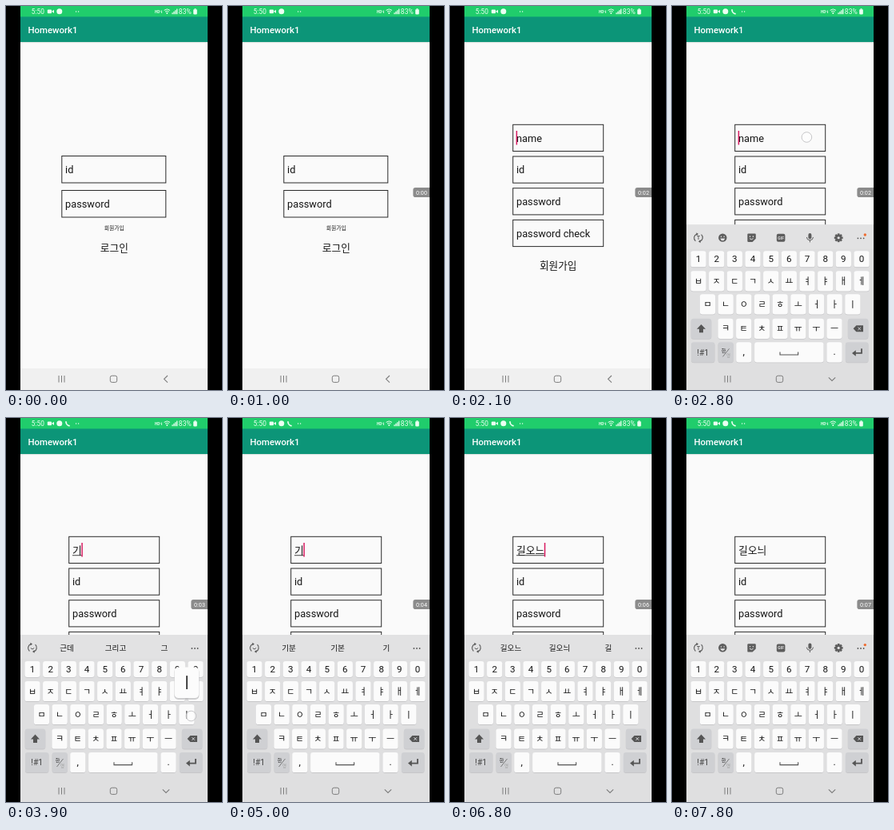
These frames come from a looping animation (270 px wide and 480 px high, 8 s). An HTML page:

```html
<!DOCTYPE html>
<html lang="ko">
<head>
<meta charset="utf-8">
<title>Sign-up screen</title>
<style>
  html, body { margin: 0; width: 100%; height: 100%; overflow: hidden; background: #000; }
  svg { display: block; width: 100%; height: 100%; }
  text { font-family: Roboto, "Noto Sans CJK KR", "Noto Sans CJK JP", "Noto Sans CJK", sans-serif; white-space: pre; }
</style>
</head>
<body>
<svg id="stage" viewBox="0 0 270 480"></svg>
<script>
const LOOP = 8000;
const INK = '#161616', PINK = '#d81b60', TEAL = '#0c9578', PAPER = '#fafafa';

// Markup helpers
const rect = (x, y, w, h, fill, extra = '') =>
  `<rect x="${x}" y="${y}" width="${w}" height="${h}" fill="${fill}" ${extra}/>`;
const text = (x, y, size, str, extra = '') =>
  `<text x="${x}" y="${y}" font-size="${size}" fill="${INK}" ${extra}>${str}</text>`;
const mid = (x, y, size, str, extra = '') => text(x, y, size, str, 'text-anchor="middle" ' + extra);
const line = (d, color, width = 1, extra = '') =>
  `<path d="${d}" fill="none" stroke="${color}" stroke-width="${width}" ${extra}/>`;
const shape = (d, fill) => `<path d="${d}" fill="${fill}"/>`;
const dot = (x, y, r, fill) => `<circle cx="${x}" cy="${y}" r="${r}" fill="${fill}"/>`;
const group = (id, body, extra = '') => `<g id="${id}" ${extra}>${body}</g>`;

const box = (x, y, w, h) => rect(x, y, w, h, 'none', 'stroke="#2b2b2b"');
const field = (x, y, w, h, label, id) =>
  box(x, y, w, h) + text(x + 4.3, y + h / 2 + 4.6, 12.75, label, id ? `id="${id}"` : '');

const appWindow = body =>
  rect(18, 0, 234, 14, '#0b7a63') + rect(18, 45, 234, 408, PAPER) +
  rect(18, 45, 234, 1.2, '#dfe5e3') + rect(18, 13, 234, 32, TEAL) +
  text(27.4, 33.8, 11.4, 'Homework1', 'font-weight="500" style="fill:#fff"') + body;

const loginPage = () => appWindow(
  field(69.8, 187.5, 130, 33.5, 'id') + field(69.8, 230.5, 130, 33.5, 'password') +
  mid(135.3, 279.8, 6.8, '회원가입') + mid(135.3, 306.6, 12.7, '로그인'));

const signupPage = () => appWindow(
  ['name', 'id', 'password', 'password check'].map((label, i) =>
    field(78.7, 148.3 + i * 39.7, 113, 33.2, label, i ? '' : 'name')).join('') +
  mid(135.2, 328.6, 12.6, '회원가입') +
  group('underline', rect(83, 171.3, 1, 0.9, '#333')) +
  group('caret', rect(0, 0, 1.5, 17.5, PINK)));

function statusBar() {
  const w = '#eafff2';
  const label = (x, size, str) => text(x, 10, size, str, `style="fill:${w}"`);
  return rect(18, 0, 234, 13.4, '#20cd6c') + label(31.8, 8.4, '5:50') +
    rect(51.8, 4.6, 5.2, 4.6, w, 'rx="1"') + shape('M57 6.8L60 4.8V9Z', w) +
    dot(66.8, 6.8, 3.5, w) +
    group('phone', line('M74.8 4.2Q75.2 9 79.6 10M74.6 4.4L75.8 5.8M78.2 9.2L79.6 10', w, 1.6)) +
    dot(87.6, 7, 0.7, w) + dot(90.6, 7, 0.7, w) +
    text(186, 9, 4.6, 'HD', `style="fill:${w}" font-weight="700"`) + line('M192.4 6L194.6 8M194.6 5.4V9', w, 0.7) +
    line('M197.6 5.4Q201.4 2.4 205 5.4M199 7.2Q201.4 5.4 203.6 7.2', w, 1) + dot(201.3, 9, 1, w) +
    [0, 1, 2, 3].map(i => rect(207.4 + i * 1.9, 8.4 - i * 1.6, 1.3, 1.8 + i * 1.6, w)).join('') +
    label(215.8, 8.6, '83%') + rect(234.2, 4.2, 4.6, 6.2, w, 'rx=".8"') + rect(235.5, 3.2, 2, 1.2, w);
}

function navBar() {
  const g = '#7c7c7c';
  return group('navFill', rect(18, 453, 234, 27, 'inherit')) +
    line('M66 462V470.5M69.5 462V470.5M73 462V470.5', g) +
    rect(130.3, 462.2, 8.4, 8.2, 'none', `rx="2.2" stroke="${g}"`) +
    line('', g, 1.1, 'id="back"');
}

// Keyboard: [label, x, y]
const PITCH = 22.67;
const keyRow = (labels, x, y) => [...labels].map((s, i) => [s, x + i * PITCH, y]);
const KEYS = [
  ...keyRow('1234567890', 33, 314), ...keyRow('ㅂㅈㄷㄱㅅㅛㅕㅑㅐㅔ', 33, 341.5),
  ...keyRow('ㅁㄴㅇㄹㅎㅗㅓㅏㅣ', 44.5, 370.5), ...keyRow('ㅋㅌㅊㅍㅠㅜㅡ', 67, 401)
];
const keyAt = s => KEYS.find(k => k[0] === s);

function keyCap(x, y, w, h, fill = '#fbfbfb') {
  return rect(x - w / 2, y - h / 2 + 0.8, w, h, '#c6c6c8', 'rx="3.2"') +
    rect(x - w / 2, y - h / 2, w, h, fill, 'rx="3.2"');
}

function toolIcons() {
  const g = '#5d5d5d', pale = '#e2e2e3';
  const gear = Array.from({ length: 8 }, (_, i) =>
    rect(206.9, 282, 2.6, 3, g, `transform="rotate(${i * 45} 208.2 287.4)"`)).join('');
  return group('icons',
    mid(33, 290, 6.5, 'T', `style="fill:${g}" font-weight="700"`) +
    dot(63.3, 287.3, 5.2, g) + dot(61.5, 286, 0.8, pale) + dot(65.1, 286, 0.8, pale) +
    shape('M60.3 288.2H66.3Q65.5 291 63.3 291T60.3 288.2Z', pale) +
    shape('M95.5 282.2H103.6Q104.8 282.2 104.8 283.4V288.4L100.6 292.6H95.5Q94.3 292.6 94.3 291.4V283.4Q94.3 282.2 95.5 282.2Z', g) +
    dot(97.5, 285.8, 0.8, pale) + dot(101.4, 285.8, 0.8, pale) + line('M97 288.3Q99.3 290.5 101.6 288.3', pale) +
    rect(130.8, 282.4, 10.6, 10, g, 'rx="2"') + mid(136.1, 289.3, 5, 'GIF', `style="fill:${pale}" font-weight="700"`) +
    rect(170.4, 281.6, 4, 7.2, g, 'rx="2"') + line('M168.3 286.6Q168.6 290.4 172.4 290.4T176.5 286.6M172.4 290.4V293', g) +
    gear + dot(208.2, 287.4, 4.2, g) + dot(208.2, 287.4, 1.6, pale) + dot(241.3, 283.6, 1.7, '#ee6b2f'));
}

function keyboard() {
  const g = '#555', dark = '#cfd0d3';
  const caps = KEYS.map(([s, x, y]) => {
    const digit = /\d/.test(s);
    return keyCap(x, y, 19.2, digit ? 20 : 25.2) +
      mid(x, y + 4, digit ? 11.6 : 11, s, digit ? '' : 'font-weight="500"');
  }).join('');
  return rect(18, 271, 234, 190, '#dfdfe0') + rect(18, 271, 234, 30, '#e2e2e3') +
    line('M29.4 291.5A5.3 5.3 0 0 1 31 282.6M36.6 283.2A5.3 5.3 0 0 1 35 292', g, 1.1) +
    shape('M30.4 280.8L33 282.6L30.6 284.6ZM35.6 290L33 292L35.6 293.8Z', g) +
    [232.4, 236, 239.6].map(x => dot(x, 288, 0.9, g)).join('') +
    toolIcons() +
    group('words', line('M30.8 287.5Q33 290.5 35.2 287.5', g) +
      [76, 137, 198].map(x => mid(x, 291, 9.6, '', 'class="word"')).join('')) +
    caps +
    keyCap(36.5, 401, 25.5, 25.2, dark) + shape('M36.5 395.6L42 401.4H39V406H34V401.4H31Z', g) +
    keyCap(232.6, 401, 25.5, 25.2, dark) + shape('M226.6 401L230.4 397H239V405H230.4Z', g) +
    line('M232.4 399.2L236 402.8M236 399.2L232.4 402.8', dark) +
    keyCap(38.7, 430.5, 29.4, 25.2, dark) + mid(38.7, 434.3, 10.4, '!#1', 'style="fill:#444"') +
    keyCap(67.2, 430.5, 19.2, 25.2, dark) + mid(64.4, 430.4, 6, '한') + line('M63.5 436L71.5 426', g, 0.7) +
    mid(70.4, 437, 5.4, '영', 'style="fill:#999"') +
    keyCap(89.8, 430.5, 19.2, 25.2) + mid(89.8, 434, 12, ',') +
    keyCap(146.3, 430.5, 86.4, 25.2) + line('M135 430.2V433.6H157.6V430.2', g, 1.1) +
    keyCap(203, 430.5, 19.2, 25.2) + mid(203, 434, 12, '.') +
    keyCap(231.2, 430.5, 28.6, 25.2, dark) + line('M237 426V431.6H228', g, 1.8) + shape('M225 431.6L229.8 427.8V435.4Z', g);
}

document.getElementById('stage').innerHTML =
  '<clipPath id="view"><rect x="18" y="13" width="234" height="440"/></clipPath>' +
  rect(0, 0, 270, 480, '#000') +
  `<g clip-path="url(#view)">` + group('login', loginPage()) +
    rect(18, 13, 234, 440, '#000', 'id="dim"') + group('signup', signupPage()) + '</g>' +
  group('keys', keyboard()) + statusBar() + navBar() +
  group('popup', rect(-15.6, -58, 31.2, 39.4, '#a9a9ab', 'rx="5" opacity=".55"') +
    rect(-15.2, -59, 30.4, 38.6, '#fcfcfc', 'rx="5"') + mid(0, -33, 19, '', 'id="popChar" font-weight="500"')) +
  `<circle id="touch" r="6.3" fill="#fff" fill-opacity=".55" stroke="#b9b9bb" stroke-width=".8"/>` +
  group('timer', shape('M234.2 227H252V239H234.2Q231.4 239 231.4 236.2V229.8Q231.4 227 234.2 227Z', '#8b8b8b') +
    mid(242, 235.8, 7.2, '', 'id="clock" style="fill:#fff"')) +
  rect(252, 0, 18, 480, '#000');

const el = Object.fromEntries([...document.querySelectorAll('[id]')].map(e => [e.id, e]));
const words = [...document.querySelectorAll('.word')];

// Timeline: [start, typed text, suggestions]
const TYPING = [
  [3500, 'ㄱ', '근데 그리고 그'], [3880, '기', '근데 그리고 그'], [4280, '기', '기분 기본 기'],
  [4380, '기ㅓ', '기분 기본 기'], [4950, '기', '기분 기본 기'], [5250, '길', '길이 길을 길'],
  [5580, '길ㅇ', '길오늬 길이 길안내도'], [6080, '길오', '길오늬 길오 길'], [6280, '길온', '길온 길오늬 길'],
  [6560, '길오느', '길오느 길오늬 길'], [6950, '길오늬', '길오늬 길오늬는 길'], [7380, '길오늬', '']
];
// Key presses: [start, end, key, touch dx, touch dy]
const PRESSES = [
  [3380, 3660, 'ㄱ', 4, 4], [3780, 4150, 'ㅣ', 5.5, 2], [4290, 4550, 'ㅓ', 6, 5.5],
  [5150, 5380, 'ㄹ', 5, 5], [5480, 5760, 'ㅇ', 5, 5], [5900, 6150, 'ㅗ', 7.5, 5.5],
  [6210, 6400, 'ㄴ', 5, 5], [6480, 6720, 'ㅡ', 4, 5], [6820, 7150, 'ㅣ', 5.5, 2]
];
// Other taps: [start, end, x, y]
const TAPS = [[100, 560, 138, 277.5], [2660, 3080, 168.4, 164], [4750, 4960, 239, 405], [7280, 7560, 150, 206]];

const clamp = v => Math.max(0, Math.min(1, v));
const within = (t, a, b) => t >= a && t < b;
const active = (list, t) => list.find(([a, b]) => within(t, a, b));
const show = (e, on) => e.setAttribute('visibility', on ? 'inherit' : 'hidden');
const move = (e, x, y) => e.setAttribute('transform', `translate(${x} ${y})`);
const put = (e, str) => { if (e.textContent !== str) e.textContent = str; };

function draw(t) {
  // Window change
  const fade = clamp((t - 1330) / 78), slide = clamp((t - 1330) / 370);
  show(el.login, t < 1700);
  move(el.login, 0, -1.4 * fade);
  el.dim.setAttribute('opacity', 0.07 * fade);
  el.signup.setAttribute('opacity', fade);
  move(el.signup, 0, 120 * (1 - slide) ** 2);

  // Text entry
  const step = TYPING.filter(s => t >= s[0]).pop();
  const typed = step ? step[1] : '', hints = step ? step[2] : '';
  const width = typed.length * 11.73;
  const done = t >= 7380;
  put(el.name, typed || 'name');
  show(el.underline, typed && !done);
  el.underline.firstChild.setAttribute('width', width);
  show(el.caret, within(t, 1950, 2400) || within(t, 2650, 3200) || within(t, 3450, 7780));
  move(el.caret, done ? 82.6 : 82.6 + width, done ? 196 : 156);

  // Keyboard
  const rise = clamp((t - 2640) / 200);
  show(el.keys, rise > 0);
  move(el.keys, 0, 182 * (1 - rise) ** 2.66);
  el.navFill.setAttribute('fill', rise > 0 ? '#dfdfe0' : '#f0f0f0');
  el.back.setAttribute('d', t < 2400 ? 'M202 462L197.6 466.3L202 470.6' : 'M195.8 464.4L200 468.4L204.2 464.4');
  show(el.phone, t >= 2400);
  show(el.icons, !hints);
  show(el.words, !!hints);
  words.forEach((w, i) => put(w, hints.split(' ')[i] || ''));

  // Touches
  const press = active(PRESSES, t), tap = active(TAPS, t);
  show(el.popup, !!press);
  show(el.touch, !!(press || tap));
  if (press) {
    const [, x, y] = keyAt(press[2]);
    move(el.popup, x, y);
    put(el.popChar, press[2]);
    move(el.touch, x + press[3], y + press[4]);
  } else if (tap) move(el.touch, tap[2], tap[3]);

  // Recording clock
  show(el.timer, t >= 60);
  put(el.clock, '0:0' + Math.max(0, Math.floor((t - 60) / 1000)));
}

const start = performance.now();
function tick() {
  draw((performance.now() - start) % LOOP);
  requestAnimationFrame(tick);
}
tick();
</script>
</body>
</html>
```
